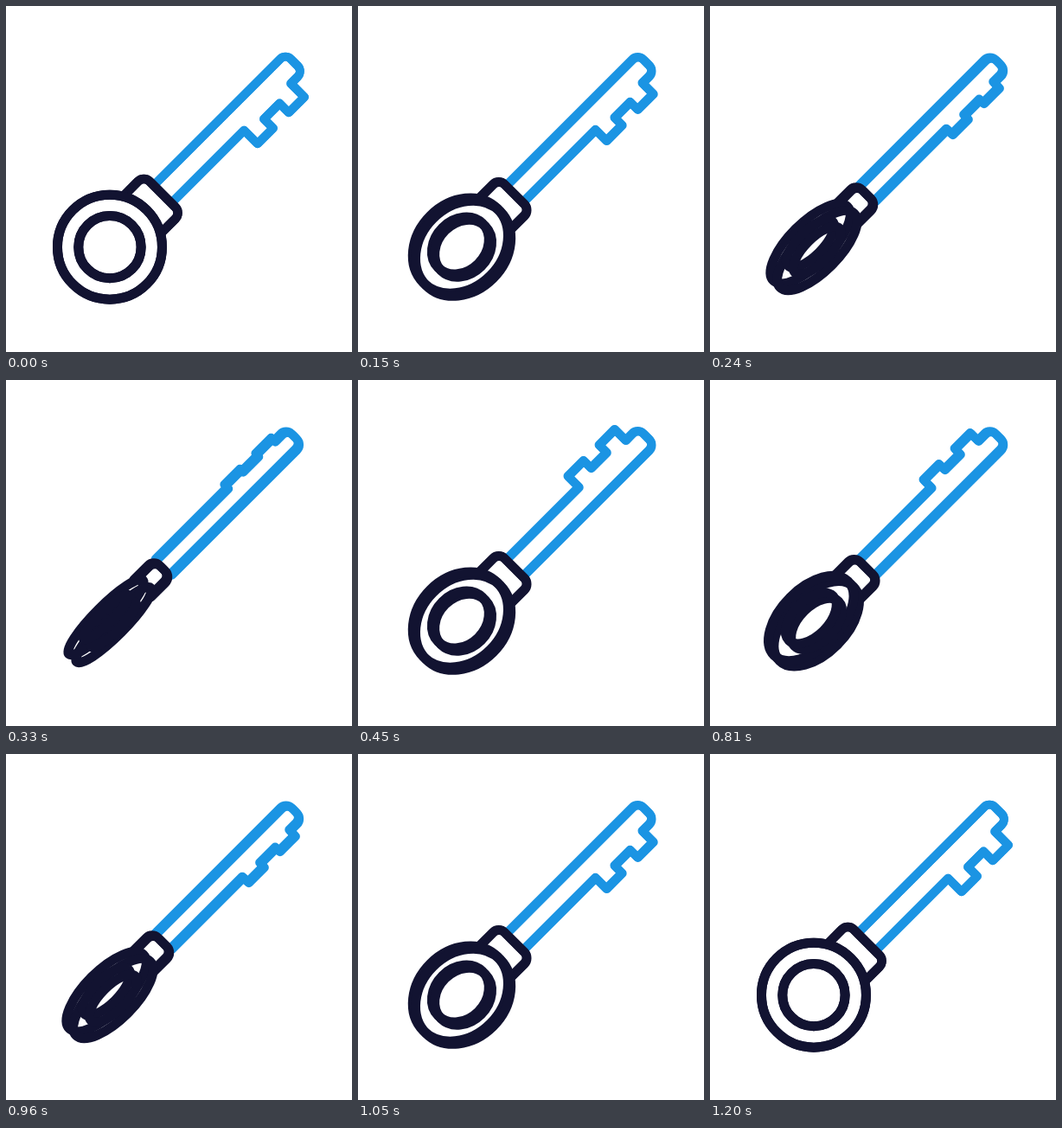
An HTML page with a canvas for the animation above (1.26 s loop, 400x400 px).

```html
<!DOCTYPE html>
<html lang="en">
<head>
<meta charset="utf-8">
<title>Turning key</title>
<style>
  html, body { margin: 0; width: 100%; height: 100%; overflow: hidden; background: #fff; }
  canvas { display: block; width: 100vw; height: 100vh; }
</style>
</head>
<body>
<canvas id="stage" width="400" height="400"></canvas>
<script>
const ctx = document.getElementById('stage').getContext('2d');
const NAVY = '#121331', BLUE = '#1b94e3';
const LOOP = 1260, TURN = 1200, STEP = 30;
const RING_X = -112.2, DEPTH = 6.6;

function stroke(color, width, trace) {
  ctx.strokeStyle = color;
  ctx.lineWidth = width;
  ctx.beginPath();
  trace();
  ctx.stroke();
}

// Shaft outline of half-width h; the teeth reach out by a share of their full depth.
function blade(h, reach) {
  const low = h + 7 * reach, high = h + 22 * reach, tip = 189.5, r = 9;
  ctx.moveTo(-24, -h);
  ctx.arcTo(tip, -h, tip, h, r);
  ctx.arcTo(tip, h, 169.5, h, r);
  const teeth = [[169.5, h], [169.5, high], [144, high], [144, low],
                 [118.5, low], [118.5, high], [93, high], [93, h], [-24, h]];
  for (const [x, y] of teeth) ctx.lineTo(x, y);
}

function collar(h) {
  const left = -59, right = -26, r = 9.5;
  ctx.moveTo(left, -h);
  ctx.arcTo(right, -h, right, h, r);
  ctx.arcTo(right, h, left, h, r);
  ctx.lineTo(left, h);
}

function draw(time) {
  // Half a turn each way round, slightly slower when the key lies flat.
  const half = time / (TURN / 2);
  const angle = Math.PI * half - 0.16 * Math.sin(2 * Math.PI * half);
  const face = Math.cos(angle), flat = Math.abs(face), edge = 1 - face * face;

  ctx.setTransform(1, 0, 0, 1, 0, 0);
  ctx.fillStyle = '#fff';
  ctx.fillRect(0, 0, 400, 400);
  ctx.translate(199.3, 199.3);
  ctx.rotate(-Math.PI / 4);
  ctx.scale(1, face < 0 ? -1 : 1);
  ctx.lineJoin = ctx.lineCap = 'round';

  for (const inset of [1, 3.5])
    stroke(BLUE, 10, () => blade(14.4 - inset * edge, flat));

  const collarHalf = Math.hypot(30.5 * flat, 13 * Math.sin(angle));
  for (const inset of [0, 2])
    stroke(NAVY, 10.5, () => collar(collarHalf - inset * edge));

  for (const radius of [60.5, 36.2])
    for (const side of [-1, 1])
      stroke(NAVY, 11, () =>
        ctx.ellipse(RING_X, side * DEPTH * edge, radius, radius * flat, 0, 0, 2 * Math.PI));
}

function tick() {
  const time = performance.now() % LOOP;
  draw(Math.min(TURN, Math.floor(time / STEP) * STEP));
  requestAnimationFrame(tick);
}
tick();
</script>
</body>
</html>
```
